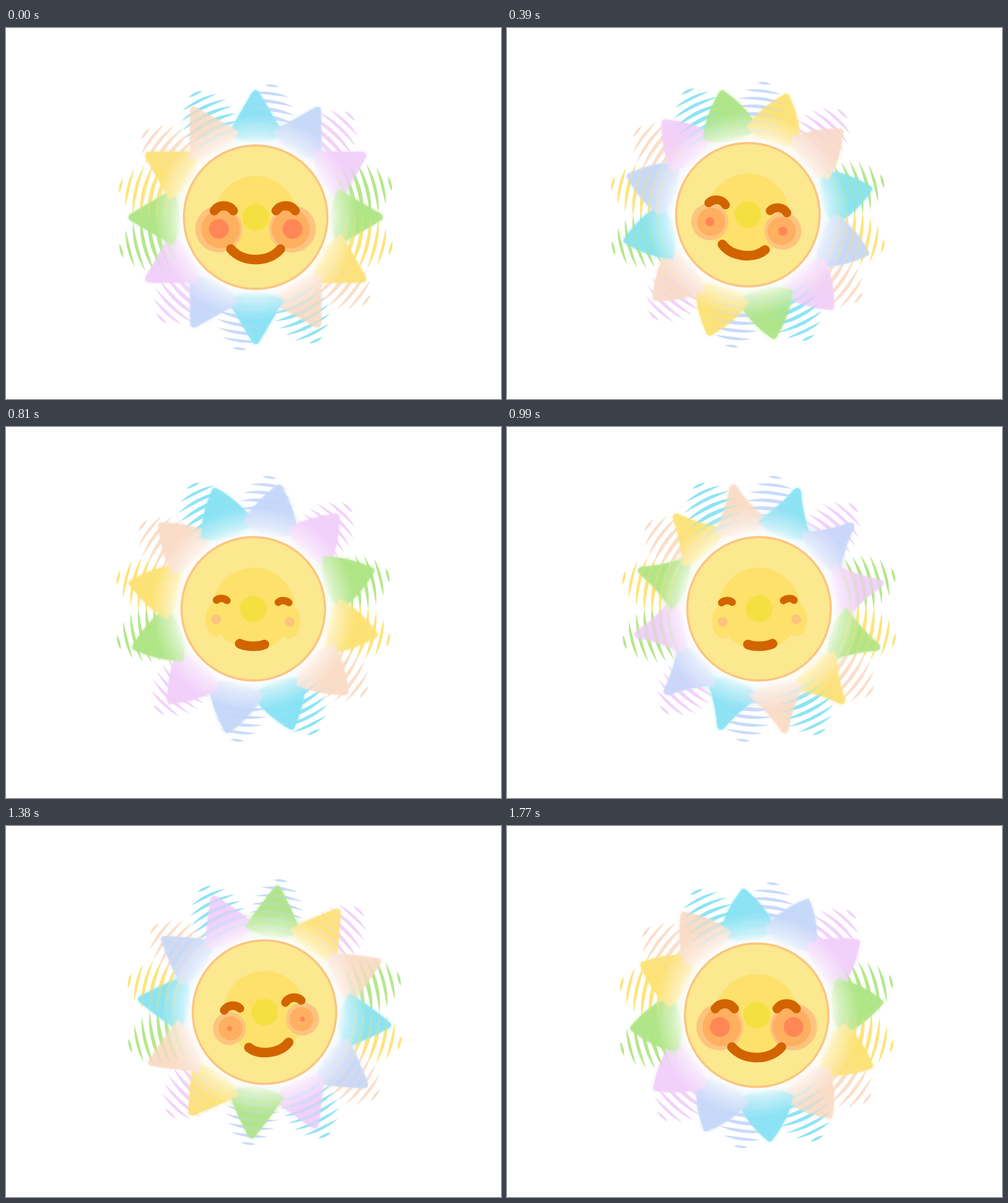
An HTML page with a canvas that plays this animation: 800 by 600 pixels, repeating every 1.8 s.

```html
<!DOCTYPE html>
<html lang="en">
<head>
<meta charset="utf-8">
<title>Smiling sun</title>
<style>
html, body { margin: 0; width: 100%; height: 100%; overflow: hidden; background: #fff; }
canvas { display: block; }
</style>
</head>
<body>
<canvas id="stage" width="800" height="600"></canvas>
<script>
const ctx = document.getElementById('stage').getContext('2d');
const LOOP = 1800, STEP = 30, TAU = Math.PI * 2, DEG = Math.PI / 180;
const FACE_R = 117, TIP_R = 207;

// Clockwise from the top, repeated twice around the sun
const HUES = ['#86e2f3', '#c5d8f9', '#f1cffa', '#aee583', '#fde272', '#fadcc6'];

const mix = (a, b, p) => a + (b - a) * p;
const smooth = p => p * p * (3 - 2 * p);
const ease = (p, n) => p ** n / (p ** n + (1 - p) ** n);

// Side swing from -1 to 1: out, slowly across, and back
function swing(p) {
  if (p < 0.25) return -ease(p * 4, 2.5);
  if (p < 0.75) return 2 * ease(p * 2 - 0.5, 1.35) - 1;
  return 1 - ease(p * 4 - 3, 2.5);
}

// Rise from 0 to 1 and back
const rise = p => ease(p < 0.5 ? p * 2 : 2 - p * 2, 2.5);

function disc(x, y, r, color, ry = r) {
  if (r <= 0) return;
  ctx.fillStyle = color;
  ctx.beginPath();
  ctx.ellipse(x, y, r, ry, 0, 0, TAU);
  ctx.fill();
}

// A ray pointing up; pinch > 0 hollows the sides, < 0 swells them
function ray(color, pinch) {
  const base = 134, wide = 45, round = 6;
  const midY = -(base + TIP_R) / 2, midX = wide * (0.6 - 0.22 * pinch);
  ctx.beginPath();
  ctx.moveTo(-wide, -base);
  ctx.quadraticCurveTo(-midX, midY, -round, round - TIP_R);
  ctx.quadraticCurveTo(0, -TIP_R - 3, round, round - TIP_R);
  ctx.quadraticCurveTo(midX, midY, wide, -base);
  ctx.quadraticCurveTo(0, -base + 24, -wide, -base);
  ctx.fillStyle = ctx.shadowColor = color;
  ctx.shadowBlur = 5;
  ctx.fill();
  ctx.shadowBlur = 0;
}

function rays(spin, pinch) {
  ctx.save();
  ctx.rotate(spin);
  ctx.globalAlpha = 0.78;
  for (let i = 0; i < 12; i++) {
    ray(HUES[i % 6], pinch);
    ctx.rotate(TAU / 12);
  }
  ctx.restore();
}

// Soft colour wheel behind the face
function wash(spin) {
  const wheel = ctx.createConicGradient(spin - Math.PI / 2, 0, 0);
  for (let i = 0; i <= 12; i++) wheel.addColorStop(i / 12, HUES[i % 6]);
  ctx.save();
  ctx.globalAlpha = 0.5;
  ctx.filter = 'blur(8px)';
  disc(0, 0, 154, wheel);
  ctx.restore();
}

// Arc that thins out towards both ends
function sliver(mid, half, r, thick) {
  const n = 12;
  ctx.beginPath();
  for (let i = 0; i <= 2 * n; i++) {
    const u = i <= n ? 2 * i / n - 1 : 3 - 2 * i / n;
    const a = (mid + half * u - 90) * DEG;
    const rr = r + (i <= n ? 1 : -1) * thick * (1 - u * u);
    ctx.lineTo(rr * Math.cos(a), rr * Math.sin(a));
  }
  ctx.fill();
}

// Still spikes made of arcs, a little shorter at the top and bottom
function stripes(alpha) {
  ctx.save();
  ctx.globalAlpha = alpha;
  for (let i = 0; i < 12; i++) {
    const angle = 30 * i - 20 + 6 * Math.sin((i - 1.5) * 60 * DEG);
    const tip = 224 - 11 * Math.cos(angle * DEG) ** 16;
    ctx.fillStyle = HUES[i % 6];
    for (let k = 0; k < 7; k++) {
      sliver(angle, 18 - 15 * 0.64 ** k, tip - k * 12.8, 2 + 0.3 * Math.min(k, 4));
    }
  }
  ctx.restore();
}

function halo() {
  const g = ctx.createRadialGradient(0, 0, FACE_R, 0, 0, 165);
  g.addColorStop(0, 'rgba(255,255,255,0.95)');
  g.addColorStop(0.35, 'rgba(255,255,255,0.5)');
  g.addColorStop(1, 'rgba(255,255,255,0)');
  disc(0, 0, 165, g);
}

function arch(x, y, half, dip, width) {
  const bend = y + dip * 4 / 3;
  ctx.lineWidth = width;
  ctx.beginPath();
  ctx.moveTo(x - half, y);
  ctx.bezierCurveTo(x - half * 0.52, bend, x + half * 0.52, bend, x + half, y);
  ctx.stroke();
}

function cheek(x, y, joy) {
  disc(x, y, 8 + 30 * joy, '#fdc47f');
  disc(x * (1 - 0.05 * joy), y, 31 * joy, '#ffaf60');
  disc(x, y, 16 - 32 * (1 - joy), '#ff8755');
}

function face(tilt, joy) {
  disc(0, 0, FACE_R, '#fbe88f');
  ctx.strokeStyle = '#fcc480';
  ctx.lineWidth = 3.5;
  ctx.beginPath();
  ctx.arc(0, 0, FACE_R - 1, 0, TAU);
  ctx.stroke();

  ctx.save();
  ctx.rotate(tilt);
  disc(0, 0, 66.5, '#fde16b');
  for (const x of [-59.5, 59.5]) disc(x, 19, 17, '#fde16b', 27);
  disc(0, 0, 21.5, '#f4e041');
  for (const x of [-59.5, 59.5]) cheek(x, 19, joy);

  ctx.strokeStyle = '#d26400';
  ctx.lineCap = 'round';
  for (const x of [-51.5, 48.5]) {
    arch(x, mix(-12, -10.5, joy), mix(8.5, 15.5, joy), -mix(3, 8, joy), mix(12, 15, joy));
  }
  arch(0, mix(57, 51.5, joy), mix(20, 40, joy), mix(3.5, 17, joy), 15.5);
  ctx.restore();
}

function render(now) {
  const p = Math.floor(now % LOOP / STEP) * STEP / LOOP;
  const sway = swing(p), lift = rise(p), spin = p * TAU;
  const pinch = Math.sin(TAU * (13 * p + 0.05));

  ctx.fillStyle = '#fff';
  ctx.fillRect(0, 0, 800, 600);
  ctx.save();
  ctx.translate(403.5 + 14.3 * sway, 306 - 12 * lift);
  wash(spin);
  stripes(0.9);
  rays(spin, pinch);
  stripes(0.25);
  halo();
  face(-7.4 * DEG * sway, smooth(1 - lift));
  ctx.restore();
}

const start = performance.now();
function tick() {
  render(performance.now() - start);
  requestAnimationFrame(tick);
}
tick();
</script>
</body>
</html>
```
